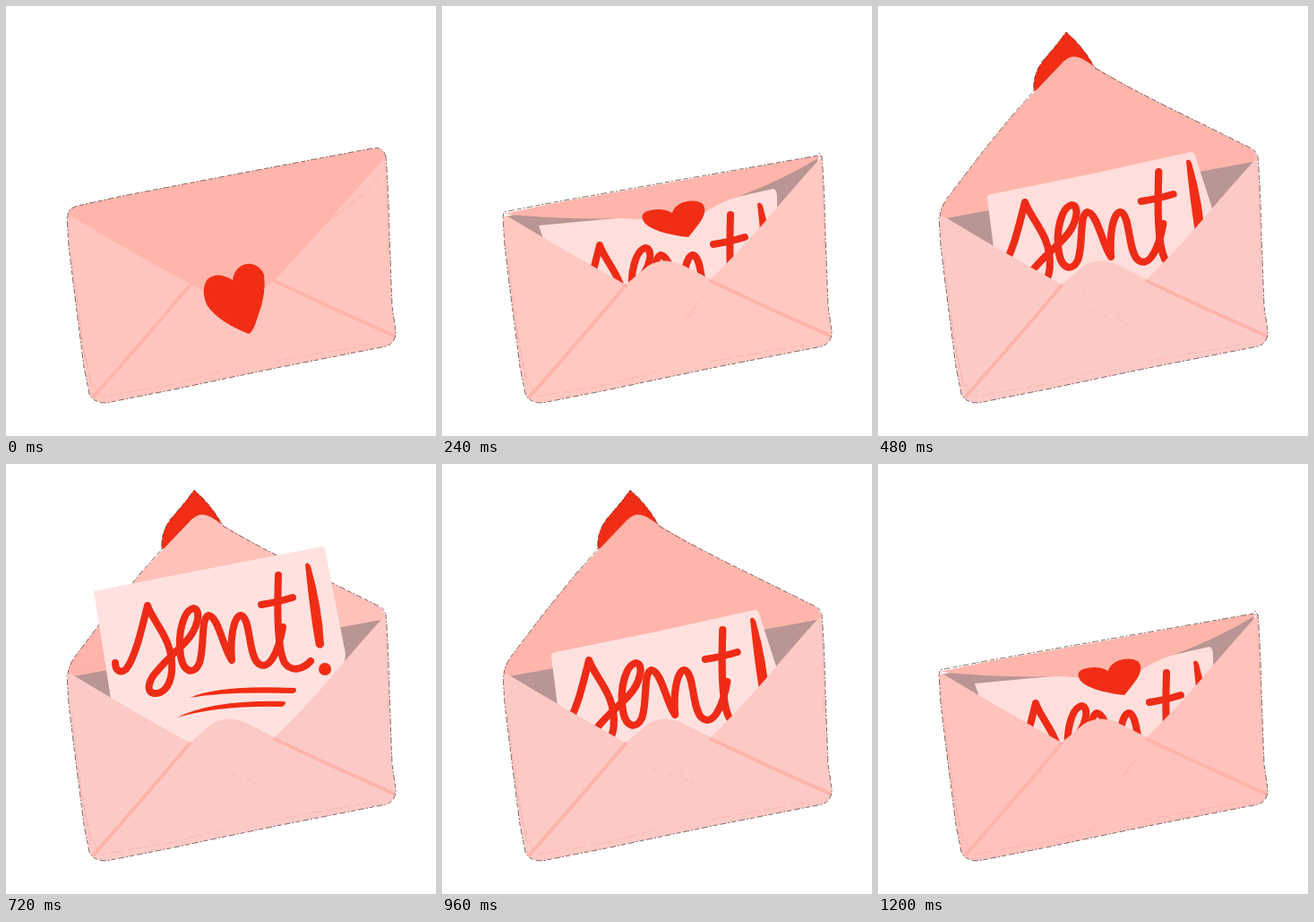
An HTML page that plays this animation: 480 px wide and 480 px high, repeating every 1.44 s.

```html
<!DOCTYPE html>
<html lang="en">
<head>
<meta charset="utf-8">
<title>Sent letter</title>
<style>
  html, body { margin: 0; width: 100%; height: 100%; overflow: hidden; background: #fff; }
  svg { display: block; width: 100vw; height: 100vh; }
  .red { fill: #f22d15; }
  .ink { fill: none; stroke: #ee2b16; stroke-width: 8; stroke-linecap: round; stroke-linejoin: round; }
  .seam { fill: none; stroke: #ffb3a9; stroke-width: 3.8; stroke-linecap: round; }
  .rim { fill: none; stroke: #4b3936; stroke-width: .7; stroke-dasharray: 5 2 2 2 7 3; }
  .grain { fill: none; stroke: #f6aaa2; stroke-width: .8; stroke-dasharray: 7 3 15 5; opacity: .75; }
</style>
</head>
<body>
<svg viewBox="0 0 480 480" role="img" aria-label="An envelope opens and shows a letter that says sent!">
  <defs>
    <linearGradient id="glow" gradientUnits="userSpaceOnUse" x1="90" y1="200" x2="165" y2="125">
      <stop offset="0" stop-color="#ffb3a9"/><stop offset="1" stop-color="#ffc1b9"/>
    </linearGradient>
  </defs>

  <path id="inside" fill="#b99593" d="M70 235L420 170L404 240L300 318H205Z"/>

  <g id="lifted">
    <path class="red" d="M210 29Q230 46 242 69L218 80L174 95Q172 77 184 61Q200 43 210 29Z"/>
    <path id="flap" d="M70 238L69 231Q72 221 80 211L108 174L127 150L150 122L207 62Q217 52 230 60Q266 84 322 112L415 158Q422 161 424 173Z"/>
    <path class="rim" d="M69 235Q70 223 80 211L108 174L127 150L150 122L174 95Q172 77 184 61Q200 43 210 29Q230 46 242 69Q270 86 322 112L415 158Q423 161 424 170"/>
  </g>

  <g id="letter">
    <path id="card"/>
    <g id="words">
      <path class="ink" d="M122 222C122 231 128 234 134 229C144 217 151 186 158 158C164 177 188 196 185 232C183 250 174 257 165 256C154 253 162 238 168 232C180 217 190 210 201 198C214 184 219 162 209 161C198 164 191 190 195 214C198 233 210 236 216 222C222 203 217 172 226 169C237 170 242 204 252 219C250 195 254 170 262 169C273 171 270 208 280 221C292 234 304 212 309 182"/>
      <path class="ink" d="M304 124C303 158 302 204 311 222C319 233 332 229 340 220M285 157Q304 154 320 149"/>
      <path class="red" d="M334 112Q337 108 340 114Q353 160 355 202Q351 209 346 203Q340 172 334 112Z"/>
      <circle class="red" cx="356" cy="229" r="7"/>
      <path class="red" d="M205 261Q237 246 323 250Q326 254 320 256Q244 254 205 261Z"/>
      <path class="red" d="M191 283Q231 263 311 265Q314 268 308 271Q239 269 191 283Z"/>
    </g>
  </g>

  <path id="front"/>
  <path class="seam" d="M98 436Q151 376 205 312M300 307Q367 339 433 368"/>
  <path class="rim" d="M424 168Q427 205 428 255L431 335L435 362Q436 376 424 380L302 404L230 419L188 428L112 443Q97 443 93 433L87 403L77 325L70 268L68 236"/>
  <path class="grain" d="M74 280Q80 350 96 428M82 350Q88 405 102 430M106 436L188 422L240 408M300 397L405 378M424 190L427 275"/>

  <path id="lid" fill="#ffb5ab"/>
  <path id="lidRim" class="rim"/>
  <path id="seal" class="red"/>
  <path id="marks" class="grain"/>
</svg>

<script>
const STEP = 240;
const $ = id => document.getElementById(id);

const sides = "Q427 205 428 255L431 335L435 362Q436 376 424 380L302 404L230 419L188 428" +
  "L112 443Q97 443 93 433L87 403L77 325L70 268L68 236";
const openFront = "M68 236L72 234Q140 275 205 311L230 290Q246 280 266 288L300 305" +
  "Q330 276 362 239Q394 201 424 168" + sides + "Z";
const closedFront = "M70 228L424 168" + sides + "Z";

const smudge = "M228 320L231 324M234 338L246 347M252 345L263 353M268 350L280 357M264 343L270 347";
const closed = {
  front: closedFront, frontFill: "#ffc5be",
  lid: "M70 233Q69 226 80 223L130 212L260 187L408 159Q420 156 424 168Q389 207 360 240Q328 276 302 304L271 330L218 317Q145 278 70 233Z",
  lidRim: "M69 236Q68 226 80 223L130 212L260 187L408 159Q421 156 424 168",
  seal: "M271 366Q238 353 225 335Q217 319 224 306Q235 295 253 306C256 284 281 282 288 300Q291 321 281 347Q276 364 271 366Z",
  marks: "M356 243Q388 224 420 186M360 239L398 211"
};
const ajar = frontFill => ({
  front: openFront, frontFill,
  card: "M108 245L205 236L330 213L370 204Q374 205 374 214L375 300L340 350H150L118 275Z",
  cardFill: "#ffdfdc",
  words: "translate(18 109)",
  lid: "M69 232L120 221L260 196L419 167L423 168Q381 194 330 213Q304 221 289 234L270 250L243 240L205 237Q132 239 69 232Z",
  lidRim: "M68 236L69 230L120 220L260 195L419 167L421 164L424 169",
  seal: "M275 258Q239 254 227 243Q219 233 229 229Q245 224 257 231C260 219 279 214 290 220Q297 227 289 240Q281 251 275 258Z",
  marks: "M272 349L284 334L298 319M276 346L281 342"
});
const half = (frontFill, cardFill) => ({
  front: openFront, frontFill, flap: "#ffb5ab",
  card: "M122 215Q121 211 127 210L240 187L349 163Q353 163 354 167L375 232L360 330H150L129 270Z",
  cardFill,
  words: "translate(2.6 61) scale(1.022 1)",
  marks: smudge
});
const full = {
  front: openFront, frontFill: "#fccac6", flap: "url(#glow)",
  card: "M98 142L128 136L230 116L353 92L356 95L379 212L366 330H135L117 262Z",
  cardFill: "#ffe2df",
  words: "",
  marks: smudge
};

const poses = [
  closed, ajar("#ffc8c1"), half("#fccac6", "#ffdedc"),
  full, half("#fcc9c4", "#ffe2df"), ajar("#ffc2bc")
];

const show = (id, on) => $(id).style.display = on ? "" : "none";

function draw(time) {
  const pose = poses[Math.floor(time / STEP) % poses.length];
  show("lifted", pose.flap);
  show("inside", pose.card);
  show("letter", pose.card);
  if (pose.flap) $("flap").setAttribute("fill", pose.flap);
  if (pose.card) {
    $("card").setAttribute("d", pose.card);
    $("card").setAttribute("fill", pose.cardFill);
    $("words").setAttribute("transform", pose.words);
  }
  $("front").setAttribute("fill", pose.frontFill);
  for (const id of ["front", "lid", "lidRim", "seal", "marks"]) {
    $(id).setAttribute("d", pose[id] || "");
  }
}

const start = performance.now();
function tick() {
  draw(performance.now() - start);
  requestAnimationFrame(tick);
}
tick();
</script>
</body>
</html>
```
